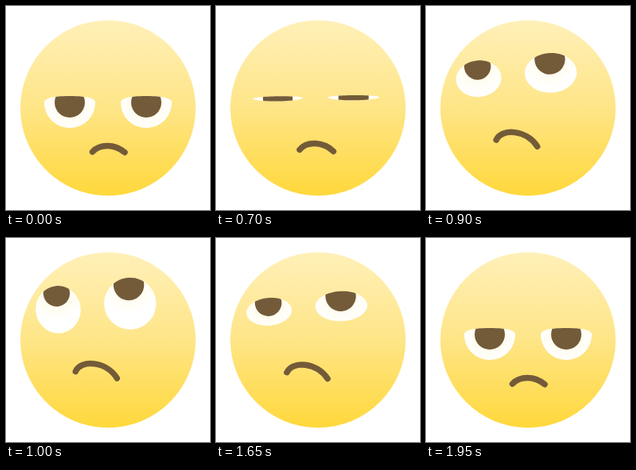
An HTML page with a canvas that plays this animation: 256 px wide and 256 px high, repeating every 2 s.

```html
<!DOCTYPE html>
<html lang="en">
<head>
<meta charset="utf-8">
<title>Eye roll</title>
<style>
  html, body { margin: 0; width: 100%; height: 100%; overflow: hidden; background: #fff; }
  canvas { display: block; width: 256px; height: 256px; }
</style>
</head>
<body>
<canvas id="stage" width="256" height="256"></canvas>
<script>
const ctx = document.getElementById('stage').getContext('2d');
const LOOP = 2000, STEP = 50;
const BROWN = '#735b39';

// Each part goes from its resting pose to its looking-up pose.
const EYES = [
  { rest: { x: 80, y: 121, rx: 32, pupil: 19 },
    up: { x: 65.5, y: 89.8, rx: 28.2, pupil: 16.6 },
    height: 29.8, look: { x: 0, y: -20.5 }, tilt: -0.1 },
  { rest: { x: 176, y: 121, rx: 32, pupil: 19 },
    up: { x: 155.8, y: 82.2, rx: 32.6, pupil: 19.2 },
    height: 32.5, look: { x: -0.8, y: -23.2 }, tilt: -0.04 }
];
const MOUTH = {
  rest: [108.5, 183, 118, 173, 136, 173, 149, 183.7],
  up: [87.3, 167.5, 94, 152, 126, 154.5, 139.3, 176]
};
const SHUT = { top: 2.4, bottom: 3.8 };
const HALF_OPEN = { top: 8, bottom: 32 };

const mix = (a, b, k) => a + (b - a) * k;
const ramp = (t, from, to) => Math.min(1, Math.max(0, (t - from) / (to - from)));
const smooth = k => k * k * (3 - 2 * k);
const cubic = k => k < 0.5 ? 4 * k ** 3 : 1 - 4 * (1 - k) ** 3;

// rise: travel of the face parts; rest and up: how far the lids open in each pose.
function poseAt(t) {
  if (t < 1500) {
    return {
      rise: cubic(ramp(t, 540, 1000)),
      rest: 1 - smooth(ramp(t, 540, 700)),
      up: smooth(ramp(t, 700, 1000))
    };
  }
  return {
    rise: 1 - cubic(ramp(t, 1540, 1950)),
    rest: smooth(ramp(t, 1770, 1950)),
    up: 1 - smooth(ramp(t, 1540, 1770))
  };
}

function drawFace() {
  const skin = ctx.createLinearGradient(0, 18, 0, 238);
  skin.addColorStop(0, '#fff0b8');
  skin.addColorStop(0.5, '#fee587');
  skin.addColorStop(1, '#ffd83b');
  ctx.fillStyle = skin;
  ctx.beginPath();
  ctx.arc(128, 128, 110, 0, Math.PI * 2);
  ctx.fill();
}

function eyePath(rx, top, bottom, lidPull) {
  const k = 0.5523;
  ctx.beginPath();
  ctx.moveTo(-rx, 0);
  ctx.bezierCurveTo(-rx, -top * k, -rx * lidPull, -top, 0, -top);
  ctx.bezierCurveTo(rx * lidPull, -top, rx, -top * k, rx, 0);
  ctx.bezierCurveTo(rx, bottom * k, rx * k, bottom, 0, bottom);
  ctx.bezierCurveTo(-rx * k, bottom, -rx, bottom * k, -rx, 0);
  ctx.closePath();
}

function drawEye(eye, pose) {
  const at = key => mix(eye.rest[key], eye.up[key], pose.rise);
  const lid = side => SHUT[side]
    + (HALF_OPEN[side] - SHUT[side]) * pose.rest
    + (eye.height - SHUT[side]) * pose.up;
  const px = eye.look.x * pose.up, py = eye.look.y * pose.up;

  ctx.save();
  ctx.translate(at('x'), at('y'));
  ctx.rotate(eye.tilt * pose.rise);
  eyePath(at('rx'), lid('top'), lid('bottom'), mix(0.5523, 0.78, pose.rest));
  const white = ctx.createRadialGradient(px, py, 16, px, py, 36);
  white.addColorStop(0, '#fffcee');
  white.addColorStop(1, '#ffffff');
  ctx.fillStyle = white;
  ctx.fill();
  ctx.clip();
  ctx.fillStyle = BROWN;
  ctx.beginPath();
  ctx.arc(px, py, at('pupil'), 0, Math.PI * 2);
  ctx.fill();
  ctx.restore();
}

function drawMouth(rise) {
  const p = MOUTH.rest.map((v, i) => mix(v, MOUTH.up[i], rise));
  ctx.strokeStyle = BROWN;
  ctx.lineWidth = 7.5;
  ctx.lineCap = 'round';
  ctx.beginPath();
  ctx.moveTo(p[0], p[1]);
  ctx.bezierCurveTo(...p.slice(2));
  ctx.stroke();
}

function draw(now) {
  const t = Math.floor((now % LOOP) / STEP) * STEP;
  const pose = poseAt(t);
  ctx.fillStyle = '#fff';
  ctx.fillRect(0, 0, 256, 256);
  drawFace();
  EYES.forEach(eye => drawEye(eye, pose));
  drawMouth(pose.rise);
}

const start = performance.now();
function tick() {
  draw(performance.now() - start);
  requestAnimationFrame(tick);
}
tick();
</script>
</body>
</html>
```
